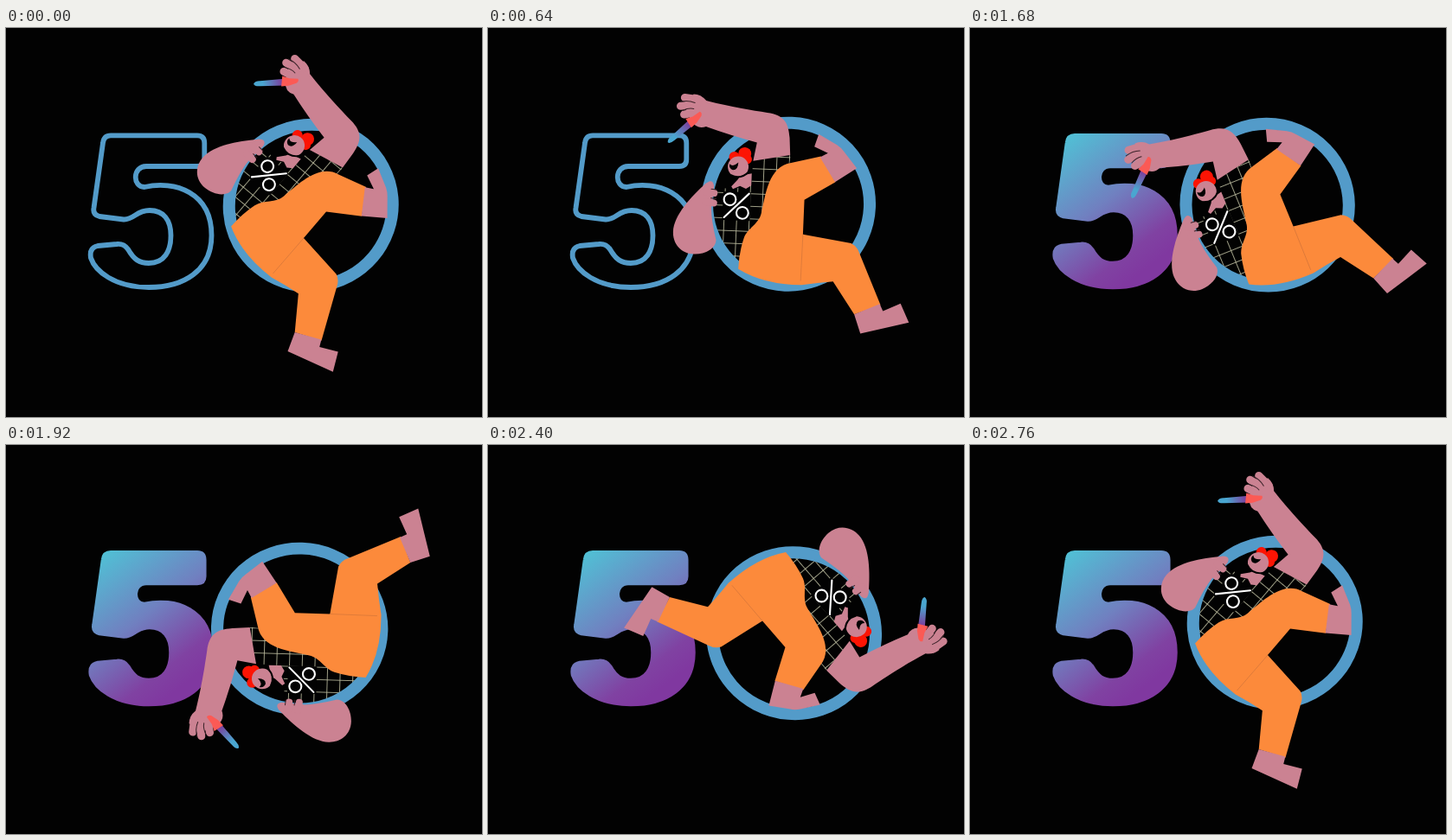
Recreate the animation shown at these times as an HTML page. Size 550 px wide and 450 px high, loop 3 s.

```html
<!DOCTYPE html>
<html lang="en">
<head>
<meta charset="utf-8">
<title>50%</title>
<style>
  html, body { margin: 0; width: 100%; height: 100%; overflow: hidden; background: #020202; }
  svg { display: block; width: 100vw; height: 100vh; }
  .skin { fill: #cb8292; }
  .finger { fill: none; stroke: #cb8292; stroke-linecap: round; }
  .crease { fill: none; stroke: #3a2228; stroke-width: 1; stroke-linecap: round; }
  .orange { fill: #fc8a3b; }
  .percent { fill: none; stroke: #fff; stroke-width: 2.1; stroke-linecap: round; }
</style>
</head>
<body>
<svg viewBox="0 0 550 450">
  <defs>
    <linearGradient id="paint" gradientUnits="userSpaceOnUse" x1="105" y1="125" x2="215" y2="270">
      <stop offset="0" stop-color="#4fc3d6"/>
      <stop offset=".5" stop-color="#7080c0"/>
      <stop offset=".85" stop-color="#8042a2"/>
      <stop offset="1" stop-color="#8038a0"/>
    </linearGradient>
    <linearGradient id="brush" gradientUnits="userSpaceOnUse" x1="208" y1="135" x2="229" y2="115">
      <stop offset=".2" stop-color="#4aa6d0"/>
      <stop offset="1" stop-color="#7c3c9c"/>
    </linearGradient>
    <pattern id="grid" patternUnits="userSpaceOnUse" x="295" y="142.600" width="14.55" height="14.55">
      <path d="M7.3 0V14.55M0 7.3H14.55" stroke="#b9b99c" stroke-width=".85"/>
    </pattern>
    <path id="shirt" d="M304 155L347 147L345 170L322 215L298 262L292 282Q272 270 262 250L257 210L262 188L282 189L303 183Z"/>
  </defs>

  <path id="five" stroke-linejoin="round" d="M121 124.300H221Q229.300 124.300 229.300 133V152Q229.300 160 221 160H162C146 160 146 184 160 184C195 176 237.500 190 237.500 240C237.500 281 205 300 165 300C125 300 103 281 98 266Q96 254 106 252L128 250Q136 249 141 256C148 268 154 272 165 272C183 272 190.500 258 190.500 240C190.500 222 182 211 166 211C150 211 148 222 136 221.500L108 218Q100 216 101.500 208L112 133Q113 124.300 121 124.300Z"/>

  <g id="roller">
    <use href="#shirt" fill="#020202"/>
    <use href="#shirt" fill="url(#grid)"/>
    <path d="M271 192H303V225H271Z" fill="#020202"/>
    <g class="percent">
      <circle cx="279" cy="201" r="6.9"/>
      <circle cx="294" cy="216" r="6.9"/>
      <path d="M273 222L301 193.5"/>
    </g>

    <circle cx="346.700" cy="203.800" r="94" fill="none" stroke="#539bc9" stroke-width="14"/>

    <!-- legs -->
    <path class="orange" d="M382 147L400 176L365 198V238L421 246Q428 249 431 257L458 316L428 328L402 291Q384 293 366 296.5Q322 298 292 281Q292 262 297 245C301 233 314 228 316 215C320 194 322 161 348 156Z"/>
    <path d="M365 238L364.500 292" fill="none" stroke="#d9783a" stroke-width=".8"/>
    <path class="skin" d="M378.500 121.500L400 133Q405 136 408 140L424 159L399.500 176L381 148L390 143L374 136Z"/>
    <path class="skin" d="M428 328L457 315L461 323L481 313.500L491.500 335L436 350Z"/>

    <!-- head -->
    <g fill="#fc1404">
      <circle cx="282" cy="151.500" r="6"/>
      <circle cx="294" cy="147.500" r="7.500"/>
      <circle cx="297" cy="154" r="5.500"/>
    </g>
    <circle class="skin" cx="287" cy="163" r="12"/>
    <path d="M277 160Q281 164 287 158Q287 167 281 167Q276 165 277 160Z" fill="#020202"/>
    <path class="skin" d="M290 173L303 170V184L297 188L290 185L282 189L280 186L287 178Z"/>
    <path d="M279 173Q290 178 299 169" fill="none" stroke="#020202" stroke-width="2"/>

    <!-- resting arm -->
    <path class="skin" d="M250 184Q258 177 260 186L258 211Q258 224 265 249C265 259 252 266 240 266C224 266 215 254 215 241C215 222 234 200 250 184Z"/>
    <path class="finger" stroke-width="8" d="M252 194L260.500 194.500M251 205L260.500 206"/>
    <path class="crease" d="M257 190L263 190.500M257 200.500L263 201"/>

    <!-- painting arm -->
    <path d="M204.500 138Q204 134 208 131L228 111L233 117L212 135.500Q207 140 204.500 138Z" fill="url(#brush)"/>
    <path class="skin" d="M232 81Q241 81 247 88C275 94 300 97 318 99C338 101 343 110 345 127L346.500 147L304 155.500L307.500 134Q276 127 248 118Q238 122 231 113L224 99Z"/>
    <path class="finger" stroke-width="9" d="M238 87L222 85.500M236 93L217.500 95.500M236 102L222 105"/>
    <path class="crease" d="M217 90.500Q226 88 234 91M220 100.500Q227 97 233 98"/>
    <path d="M224 110L232 107L240 101Q243 102 242 106L237 114L231 120Z" fill="#fb5a55"/>
  </g>
</svg>
<script>
  const LOOP = 3000, STEP = 40, TILT = 40;
  const five = document.getElementById("five");
  const roller = document.getElementById("roller");
  const progress = (t, from, to) => Math.min(1, Math.max(0, (t - from) / (to - from)));

  // The stage is slightly wider than it is tall, so the turn follows a flat ellipse.
  const turn = angle => `translate(347.5 212) scale(1.006 .994) rotate(${angle})
    scale(.994 1.006) translate(-347.5 -212)`;

  function draw() {
    const t = Math.floor(performance.now() % LOOP / STEP) * STEP;
    const angle = TILT * (1 - progress(t, 0, 680)) - (360 - TILT) * progress(t, 1600, 2760);
    roller.setAttribute("transform", turn(angle));

    const painted = t >= 1120;
    five.setAttribute("fill", painted ? "url(#paint)" : "none");
    five.setAttribute("stroke", painted ? "url(#paint)" : "#539bc9");
    five.setAttribute("stroke-width", painted ? 4.5 : 5.8);
    requestAnimationFrame(draw);
  }
  draw();
</script>
</body>
</html>
```
